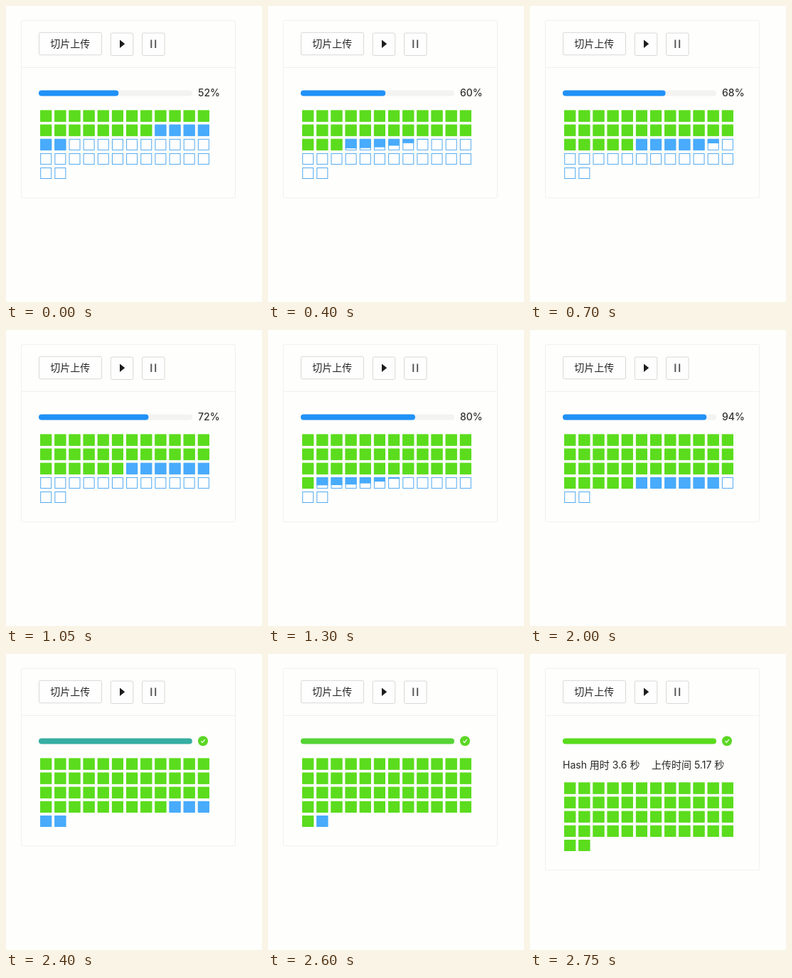
An HTML page for the animation above (3.45 s loop, 360 by 416 pixels).

```html
<!DOCTYPE html>
<html lang="zh-CN">
<head>
<meta charset="utf-8">
<title>切片上传</title>
<style>
  html, body { margin: 0; width: 100%; height: 100%; overflow: hidden; background: #fefefc; }
  svg { display: block; }
  text { font: 14px Inter, "Noto Sans CJK SC", "Noto Sans CJK", sans-serif; fill: #262626; }
  #percent { font-weight: 500; fill: #333; }
  .line { fill: none; stroke: #f0f0ee; }
  .button { fill: #fefefe; stroke: #d8d8d6; }
</style>
</head>
<body>
<svg width="360" height="416" viewBox="0 0 360 416">
  <rect id="card" class="line" x="21.5" y="20.3" width="301" rx="2"/>
  <path class="line" d="M22 86.5H322"/>

  <rect class="button" x="46.5" y="37.3" width="88" height="31.5" rx="2"/>
  <text x="62.3" y="57.8">切片上传</text>
  <rect class="button" x="147.3" y="38" width="31.5" height="31.5" rx="2"/>
  <path d="M160 47.5L167.2 53.2L160 58.9Z" fill="#1c1c1c"/>
  <rect class="button" x="191.6" y="38" width="31.5" height="31.5" rx="2"/>
  <path d="M204.3 47.5V58.9M210.2 47.5V58.9" stroke="#555" stroke-width="1.9"/>

  <rect x="46" y="118.4" width="216" height="8.2" rx="4.1" fill="#f3f3f2"/>
  <rect id="bar" x="46" y="118.4" height="8.2" rx="4.1"/>
  <text id="percent" x="270" y="127.3"></text>
  <g id="check">
    <circle cx="277" cy="122.2" r="7" fill="#5bd725"/>
    <path d="M274.3 122.3L276.3 124.3L279.8 120.2" fill="none" stroke="#fff" stroke-width="1.2"/>
  </g>
  <g id="summary">
    <text x="46" y="160.7">Hash 用时 3.6 秒</text>
    <text x="171" y="160.7">上传时间 5.17 秒</text>
  </g>
  <g id="cells"></g>
</svg>
<script>
const LOOP = 3450, STEP = 50;
const TOTAL = 50, COLUMNS = 12, PARALLEL = 6, PRELOADED = 26;
const FILL_MS = 210, BAR_LAG = 200, SUCCESS_MS = 400, SUMMARY_AT = 2700;
const SIZE = 16, BAR_WIDTH = 216;
const GREEN = [91, 220, 29], BLUE = [32, 145, 247];

// Requests leave in bursts, dense at first; the last slots only confirm
const BURSTS = [
  { first: 26, at: 225, spread: 560 },
  { first: 36, at: 1150, spread: 560 },
  { first: 47, at: 2010, spread: 80 },
  { first: 51, at: 2410, spread: 240 }
];
const LAST_SLOT = TOTAL + PARALLEL - 1;

const $ = id => document.getElementById(id);
const clamp = v => Math.min(1, Math.max(0, v));

function startTime(slot) {
  if (slot < PRELOADED) return -Infinity;
  const n = BURSTS.findLastIndex(b => slot >= b.first);
  const { first, at, spread } = BURSTS[n];
  const last = n + 1 < BURSTS.length ? BURSTS[n + 1].first - 1 : LAST_SLOT;
  return at + spread * ((slot - first) / (last - first)) ** 3;
}

function addRect(attrs) {
  const el = document.createElementNS("http://www.w3.org/2000/svg", "rect");
  for (const key in attrs) el.setAttribute(key, attrs[key]);
  return $("cells").appendChild(el);
}

// A confirmed chunk frees its slot for the one PARALLEL places later
const chunks = Array.from({ length: TOTAL }, (_, i) => {
  const x = 48.2 + (i % COLUMNS) * 20.15;
  const y = 146.6 + Math.floor(i / COLUMNS) * 20.1;
  return {
    start: startTime(i),
    done: startTime(i + PARALLEL),
    frame: addRect({ x: x + .5, y: y + .5, width: SIZE - 1, height: SIZE - 1, fill: "#fefefe" }),
    fill: addRect({ x, y, width: SIZE })
  };
});
const successAt = Math.max(...chunks.map(c => c.start)) + FILL_MS;

const part = (c, t) => t >= c.done ? 1 : clamp((t - c.start) / FILL_MS);
const loaded = t => chunks.reduce((sum, c) => sum + part(c, t), 0);

// The bar trails the upload: mean progress over the last moments
function barShare(t) {
  const samples = 10;
  let sum = 0;
  for (let i = 0; i < samples; i++) sum += loaded(t - BAR_LAG * (i + .5) / samples);
  return sum / samples / TOTAL;
}

function draw(t) {
  for (const c of chunks) {
    const done = t >= c.done;
    c.frame.setAttribute("stroke", done ? `rgb(${GREEN})` : "#52aaf0");
    c.fill.setAttribute("fill", done ? `rgb(${GREEN})` : "#48abfb");
    c.fill.setAttribute("height", SIZE * part(c, t));
  }

  const mix = clamp((t - successAt) / SUCCESS_MS);
  $("bar").setAttribute("width", BAR_WIDTH * barShare(t));
  $("bar").setAttribute("fill", `rgb(${BLUE.map((v, i) => Math.round(v + (GREEN[i] - v) * mix))})`);

  const complete = t >= successAt;
  $("percent").textContent = complete ? "" : Math.floor(loaded(t) * 100 / TOTAL) + "%";
  $("check").style.display = complete ? "" : "none";

  const summary = t >= SUMMARY_AT;
  $("summary").style.display = summary ? "" : "none";
  $("cells").setAttribute("transform", `translate(0 ${summary ? 34 : 0})`);
  $("card").setAttribute("height", 249.4 + (summary ? 34 : 0));
}

const origin = performance.now();
function tick() {
  const t = (performance.now() - origin) % LOOP;
  draw(Math.floor(t / STEP) * STEP);
  requestAnimationFrame(tick);
}
tick();
</script>
</body>
</html>
```
